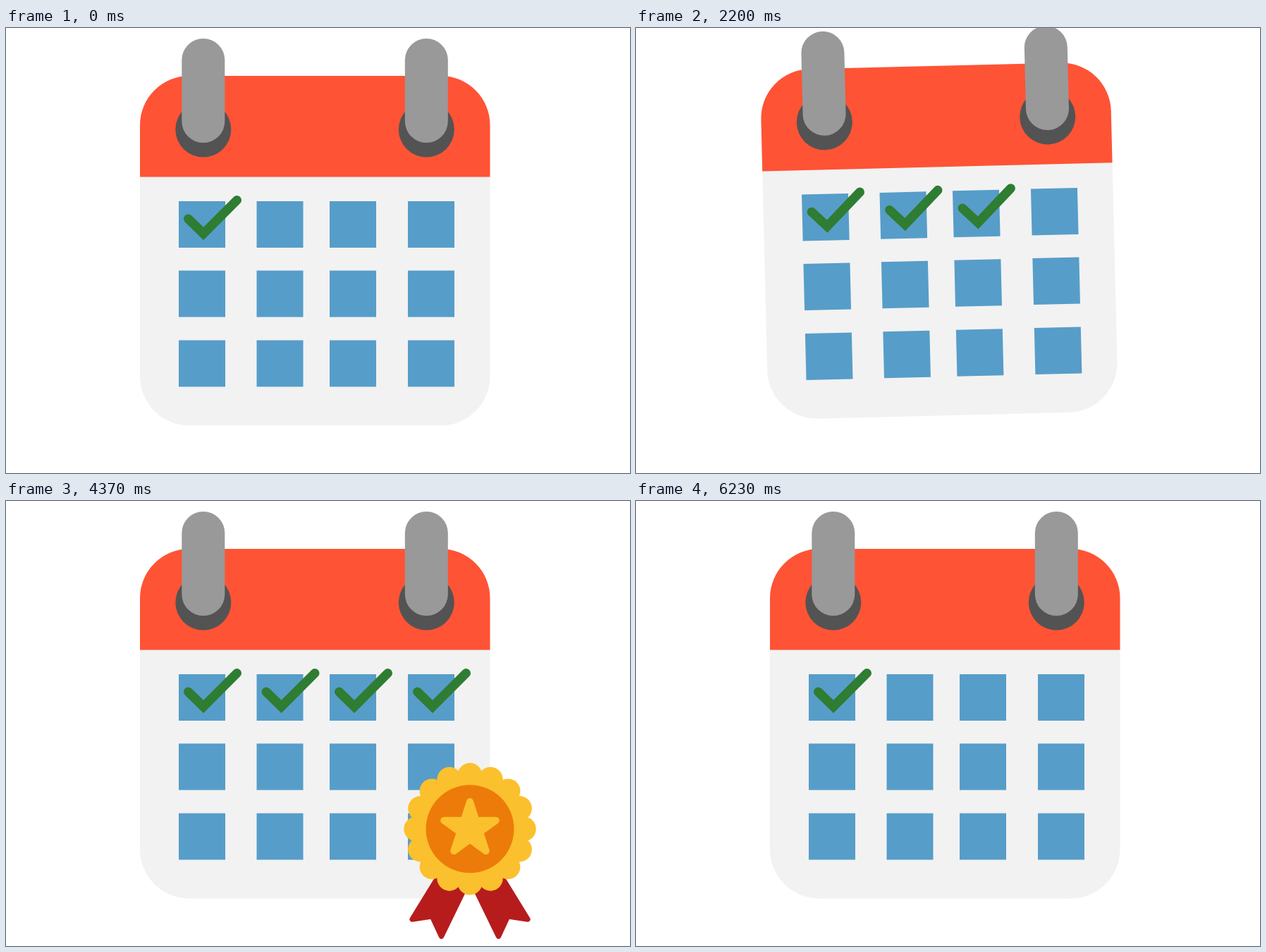
Animation of 885 by 632 pixels, one loop 6560 ms. Source, as an HTML page with a canvas:

```html
<!DOCTYPE html>
<html lang="en">
<head>
<meta charset="utf-8">
<title>Calendar reward</title>
<style>
  html, body { margin: 0; width: 100%; height: 100%; overflow: hidden; background: #fff; }
  canvas { display: block; }
</style>
</head>
<body>
<canvas id="stage" width="885" height="632"></canvas>
<script>
const ctx = document.getElementById('stage').getContext('2d');
const LOOP = 6560;
const PIVOT = { x: -143, y: 647 };
const COLS = [245, 355.5, 459, 570];
const ROWS = [246, 344.5, 443.5];

// Each swing brings in a new sheet; times in ms.
const SWINGS = [
  { end: 1177, length: 360, checks: 2 },
  { end: 2320, length: 480, checks: 3 },
  { end: 3317, length: 480, checks: 4 },
  { end: 6228, length: 300, checks: 1 }
];
const MEDAL_START = 4066.6;

function fill(color, build) {
  ctx.beginPath();
  build();
  ctx.fillStyle = color;
  ctx.fill();
}

const disc = (x, y, r, color) => fill(color, () => ctx.arc(x, y, r, 0, 2 * Math.PI));

function roundedPolygon(points, width, color) {
  fill(color, () => {
    points.forEach(([x, y]) => ctx.lineTo(x, y));
    ctx.closePath();
  });
  ctx.strokeStyle = color;
  ctx.lineWidth = width;
  ctx.lineJoin = 'round';
  ctx.stroke();
}

function drawCheck(x) {
  ctx.beginPath();
  ctx.moveTo(x + 13.5, 271);
  ctx.lineTo(x + 35, 292);
  ctx.lineTo(x + 82.5, 244.5);
  ctx.strokeStyle = '#2e7d32';
  ctx.lineWidth = 13;
  ctx.lineCap = 'round';
  ctx.lineJoin = 'miter';
  ctx.stroke();
}

function drawSheet(checks) {
  fill('#fff', () => ctx.rect(PIVOT.x, -12, 1171, 659));
  fill('#f2f2f2', () => ctx.roundRect(190, 211, 496.5, 353.5, [0, 0, 70, 70]));
  fill('#ff5335', () => ctx.roundRect(190, 68, 496.5, 143.5, [70, 70, 0, 0]));
  for (const x of [279.8, 596.3]) {
    disc(x, 144, 39.5, '#535353');
    fill('#999', () => ctx.roundRect(x - 30.5, 15, 61, 148, 30.5));
  }
  for (const y of ROWS) {
    for (const x of COLS) fill('#579dc9', () => ctx.rect(x, y, 66, 66));
  }
  COLS.slice(0, checks).forEach(drawCheck);
}

// Drawn around the middle of the whole badge.
function drawMedal(scale) {
  ctx.save();
  ctx.translate(658, 497);
  ctx.scale(scale, scale);
  for (const side of [-1, 1]) {
    const tail = [[28, 17], [38.4, 33.5], [65.5, 77.6], [43, 74.2], [32.4, 97], [8.4, 47.5], [2, 33]];
    roundedPolygon(tail.map(([x, y]) => [side * x, y]), 6, '#b71c1c');
  }
  ctx.translate(0, -25);
  disc(0, 0, 62, '#fbc02d');
  for (let i = 0; i < 16; i++) {
    const a = i * Math.PI / 8;
    disc(61 * Math.cos(a), 61 * Math.sin(a), 14, '#fbc02d');
  }
  disc(0, 0, 50, '#ed7b09');
  const star = Array.from({ length: 10 }, (_, i) => {
    const r = i % 2 ? 11.8 : 31;
    const a = i * Math.PI / 5;
    return [r * Math.sin(a), -r * Math.cos(a)];
  });
  roundedPolygon(star, 8, '#fbc02d');
  ctx.restore();
}

// Step response of a damped spring.
function spring(ms) {
  const w = 0.0091, decay = 0.00369;
  return 1 - Math.exp(-decay * ms) * (Math.cos(w * ms) + decay / w * Math.sin(w * ms));
}

// Snap to 30 pictures a second, on 10 ms marks.
function snap(ms) {
  const rest = ms % 100;
  return (Math.floor(ms / 100) * 3 + (rest >= 30) + (rest >= 70)) * 100 / 3;
}

function draw(now) {
  const t = snap(now % LOOP);
  const done = SWINGS.filter(s => t >= s.end);
  drawSheet(done.length ? done.at(-1).checks : 1);
  if (t > MEDAL_START + 1 && done.length < SWINGS.length) {
    drawMedal(t > 5535 ? 1 : spring(t - MEDAL_START));
  }

  const swing = SWINGS.find(s => t < s.end && t > s.end - s.length);
  if (swing) {
    const left = (swing.end - t) / swing.length;
    ctx.save();
    ctx.translate(PIVOT.x, PIVOT.y);
    ctx.rotate(-Math.PI / 2 * left ** 3);
    ctx.translate(-PIVOT.x, -PIVOT.y);
    drawSheet(swing.checks);
    ctx.restore();
  }
}

const start = performance.now();
function tick() {
  draw(performance.now() - start);
  requestAnimationFrame(tick);
}
tick();
</script>
</body>
</html>
```
